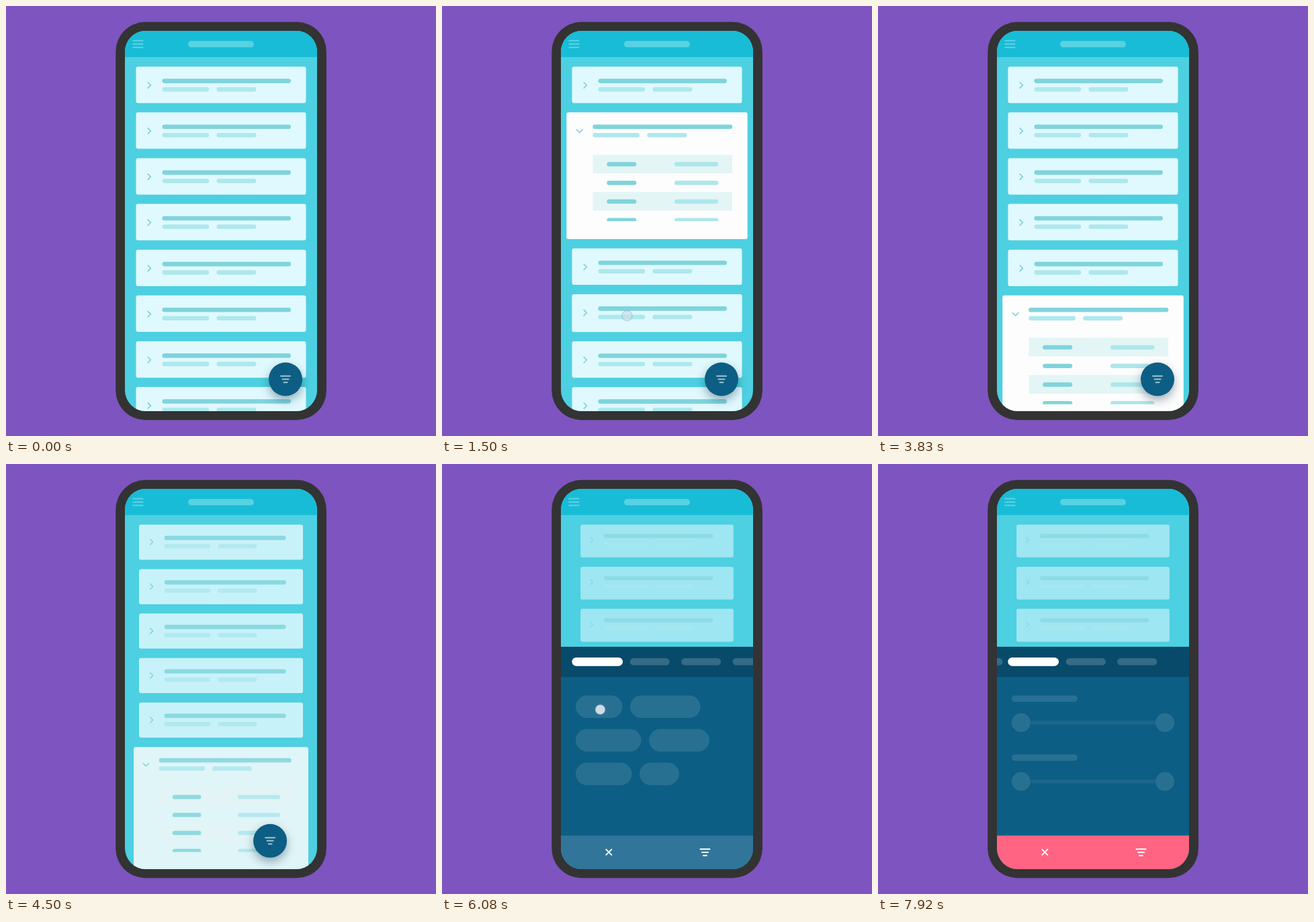
An HTML page with a canvas that plays this animation: 640 by 640 pixels, repeating every 8000 ms.

```html
<!DOCTYPE html>
<html lang="en">
<head>
<meta charset="utf-8">
<title>Expandable list and filter sheet</title>
<style>
html, body { margin: 0; width: 100%; height: 100%; overflow: hidden; background: #7e54c0; }
canvas { display: block; width: 100vw; height: 100vh; object-fit: contain; }
</style>
</head>
<body>
<canvas id="stage"></canvas>
<script>
const LOOP = 8000, SIZE = 640;
const canvas = document.getElementById('stage');
const ctx = canvas.getContext('2d');
const ratio = window.devicePixelRatio || 1;
canvas.width = canvas.height = SIZE * ratio;

const LEFT = 177, RIGHT = 463, TOP = 37, BOTTOM = 603, MID = 320;
const CARD = [224, 249, 255], OPEN = [253, 253, 253];
const BAR = [50, 117, 154], PINK = [255, 100, 130], BLUE = [13, 94, 132];

const clamp = x => Math.max(0, Math.min(1, x));
const lerp = (a, b, p) => a + (b - a) * p;
const mix = (a, b, p) => `rgb(${a.map((v, i) => Math.round(lerp(v, b[i], p)))})`;
const smooth = x => (1 - Math.cos(Math.PI * x)) / 2;
const step = (t, start, length) => smooth(clamp((t - start) / length));
const out = (t, start, length) => 1 - (1 - clamp((t - start) / length)) ** 3;

// Card index, time it opens, time it closes
const expansions = [[1, 330, 1470], [3, 1470, 2498], [5, 3180, Infinity]];
// x, y, time of the tap
const taps = [[275, 189, 300], [275.5, 461, 1440], [275, 324, 2460], [275, 462, 3140],
  [416, 555, 4220], [235.5, 365.5, 6090]];
// x, y, width of each filter chip
const chips = [[199, 344.5, 69.5], [280, 344.5, 104.5], [199, 394.5, 97.5],
  [308, 394.5, 90], [199, 444.5, 83.5], [294, 444.5, 59]];

function box(x, y, w, h, r, fill) {
  ctx.beginPath();
  ctx.roundRect(x, y, w, h, Math.max(0, Math.min(r, w / 2, h / 2)));
  ctx.fillStyle = fill;
  ctx.fill();
}

function pill(x1, x2, cy, h, fill) {
  box(x1, cy - h / 2, x2 - x1, h, h / 2, fill);
}

function dot(x, y, r, fill) {
  ctx.beginPath();
  ctx.arc(x, y, r, 0, 7);
  ctx.fillStyle = fill;
  ctx.fill();
}

function withAlpha(a, draw) {
  if (a <= 0) return;
  ctx.save();
  ctx.globalAlpha *= a;
  draw();
  ctx.restore();
}

function shadow(on) {
  ctx.shadowColor = on ? 'rgba(0,45,65,.38)' : 'transparent';
  ctx.shadowBlur = on ? 14 * ratio : 0;
  ctx.shadowOffsetY = on ? 6 * ratio : 0;
}

function filterIcon(x, y, fill) {
  [16, 11, 7].forEach((w, i) => pill(x - w / 2, x + w / 2, y + (i - 1) * 4.7, 2, fill));
}

function chevron(x, y, turn, scale) {
  ctx.save();
  ctx.translate(x, y);
  ctx.rotate(turn * Math.PI / 2);
  ctx.scale(scale, scale);
  ctx.beginPath();
  ctx.moveTo(-2.3, -4.7);
  ctx.lineTo(2.4, 0);
  ctx.lineTo(-2.3, 4.7);
  ctx.strokeStyle = '#7dcfdb';
  ctx.lineWidth = 1.6;
  ctx.stroke();
  ctx.restore();
}

function details(l, r, y, bottom, k) {
  ctx.save();
  ctx.beginPath();
  ctx.rect(l, y, r - l, Math.max(0, bottom - y));
  ctx.clip();
  const row = 27.75 * k;
  for (let i = 0; i < 4; i++) {
    const top = y + i * row, cy = top + row / 2 + 0.5;
    if (i % 2 === 0) box(l, top, r - l, row, 0, '#e3f5f5');
    pill(l + 21 * k, MID - 30.7 * k, cy, 6.6 * k, '#80d4dc');
    pill(MID + 26 * k, r - 21 * k, cy, 6.6 * k, '#ade6ec');
  }
  ctx.restore();
}

function card(y, open, shrink) {
  const k = lerp(1, 0.9, shrink);
  const w = lerp(253, 269.6, open) * k, h = (54.2 + 136.4 * open) * k;
  const l = MID - w / 2, r = MID + w / 2, text = l + 39 * k;
  const line = lerp(6.6, 6.2, shrink), s = lerp(1, 0.955, shrink);
  const y2 = y + lerp(33.9, 29, shrink);
  box(l, y, w, h, 3, mix(CARD, OPEN, open));
  chevron(l + lerp(19.5, 16.3, shrink), y + lerp(27.7, 23, shrink), open, k);
  const textEnd = r - lerp(22.5, 30.5, shrink);
  pill(text, textEnd, y + lerp(21.4, 17, shrink), line, '#80d4dc');
  pill(text, text + 69.8 * s, y2, line, '#ade8ed');
  pill(text + 81 * s, text + 140 * s, y2, line, '#ade8ed');
  if (open > 0) {
    const end = y + Math.min(162 * k, h - 16 * k);
    withAlpha(clamp(open * 1.5), () => details(text, r - 22.5 * k, y + 62.8 * k, end, k));
  }
  return h;
}

function list(t) {
  const shrink = step(t, 4330, 420);
  const open = Array(9).fill(0);
  for (const [i, from, to] of expansions) open[i] = step(t, from, 400) - step(t, to, 400);
  withAlpha(lerp(1, 0.55, shrink), () => {
    let y = 90.2;
    for (const p of open) {
      if (y > BOTTOM) break;
      y += card(y, p, shrink) + 13.93;
    }
  });
}

function header() {
  box(LEFT, TOP, RIGHT - LEFT, 39, 0, '#18bcd6');
  pill(271, 369, 56.8, 9.6, '#58d2e3');
  for (let i = 0; i < 3; i++) pill(188.3, 204.5, 51.7 + i * 5, 1.8, '#6ad5e3');
}

function tabs(q, rise) {
  const y = lerp(317, 272, rise);
  box(LEFT, y, RIGHT - LEFT, 46, 0, '#084a6a');
  for (let i = 0; i < 4; i++) {
    const d = i - q, focus = clamp(1 - Math.abs(d));
    const x = d < 0 ? 231.2 + d * 75 : d < 1 ? 231.2 + d * 78.1 : 309.3 + (d - 1) * 76.4;
    const half = lerp(29.5, 37.8, focus);
    pill(x - half, x + half, y + 22.3, lerp(10.4, 12.8, focus),
      `rgba(255,255,255,${lerp(0.18, 1, focus)})`);
  }
}

function pages(t, q) {
  const soft = 'rgba(255,255,255,.11)', width = RIGHT - LEFT;
  ctx.save();
  ctx.translate(-q * width, 0);
  chips.forEach(([x, y, w], i) => {
    box(x, y, w, 33.4, 17, soft);
    if (i === 0) withAlpha(step(t, 6120, 250), () => box(x, y, w, 33.4, 17, mix(PINK, PINK, 0)));
  });
  ctx.translate(width, 0);
  for (const y of [349.3, 437]) {
    pill(199, 297, y, 9.6, soft);
    pill(227, 413, y + 35.6, 5.5, 'rgba(255,255,255,.06)');
    dot(213, y + 35.6, 14, soft);
    dot(427, y + 35.6, 14, soft);
  }
  ctx.restore();
}

function sheet(t) {
  const move = step(t, 4300, 430), grow = step(t, 4720, 320);
  const settle = out(t, 5200, 300), bar = out(t, 5220, 320);
  const q = step(t, 6860, 480);
  const white = `rgba(255,255,255,${lerp(0.62, 1, bar)})`;

  if (settle > 0) tabs(q, settle);

  // The button swings along an arc to the bottom centre, then grows into the sheet
  const angle = move * Math.PI / 2;
  const x = lerp(MID, 416, Math.cos(angle));
  const y = lerp(555.5, 578, 1 - Math.cos(angle));
  const size = lerp(50, 286, grow);
  const corner = size / 2 * (1 - clamp((t - 5030) / 180));
  shadow(settle === 0);
  box(x - size / 2, y + 25 - size, size, size, corner, mix(BLUE, BLUE, 0));
  shadow(false);

  withAlpha(step(t, 5330, 300), () => pages(t, q));
  if (bar > 0) {
    box(LEFT, lerp(BOTTOM, 553, bar), RIGHT - LEFT, 51, 0, mix(BAR, PINK, step(t, 6140, 300)));
  }
  filterIcon(lerp(x, 391.5, bar), y, white);
  withAlpha(bar, () => {
    const cx = lerp(MID, 248.3, bar);
    ctx.beginPath();
    ctx.moveTo(cx - 4.6, 573.2);
    ctx.lineTo(cx + 4.6, 582.4);
    ctx.moveTo(cx + 4.6, 573.2);
    ctx.lineTo(cx - 4.6, 582.4);
    ctx.strokeStyle = '#fff';
    ctx.lineWidth = 1.9;
    ctx.stroke();
  });
}

function finger(x, y, a) {
  withAlpha(a, () => {
    dot(x, y, 8.2, 'rgba(110,140,160,.6)');
    dot(x, y, 7.1, 'rgba(245,252,255,.75)');
  });
}

function touches(t) {
  for (const [x, y, at] of taps) {
    finger(x, y, t < at ? step(t, at - 160, 120) : 1 - step(t, at + 10, 120));
  }
  const drag = step(t, 6830, 300);
  finger(lerp(390, 240, drag), 430, step(t, 6720, 100) - step(t, 7120, 130));
}

function draw(t) {
  ctx.setTransform(ratio, 0, 0, ratio, 0, 0);
  box(0, 0, SIZE, SIZE, 0, '#7e54c0');
  box(163.3, 23.8, 313.6, 592.4, 44, '#333333');
  ctx.save();
  ctx.beginPath();
  ctx.roundRect(LEFT, TOP, RIGHT - LEFT, BOTTOM - TOP, 31);
  ctx.clip();
  box(LEFT, TOP, RIGHT - LEFT, BOTTOM - TOP, 0, '#4dd0e1');
  list(t);
  header();
  sheet(t);
  touches(t);
  ctx.restore();
}

const start = performance.now();
function frame() {
  draw((performance.now() - start) % LOOP);
  requestAnimationFrame(frame);
}
frame();
</script>
</body>
</html>
```
